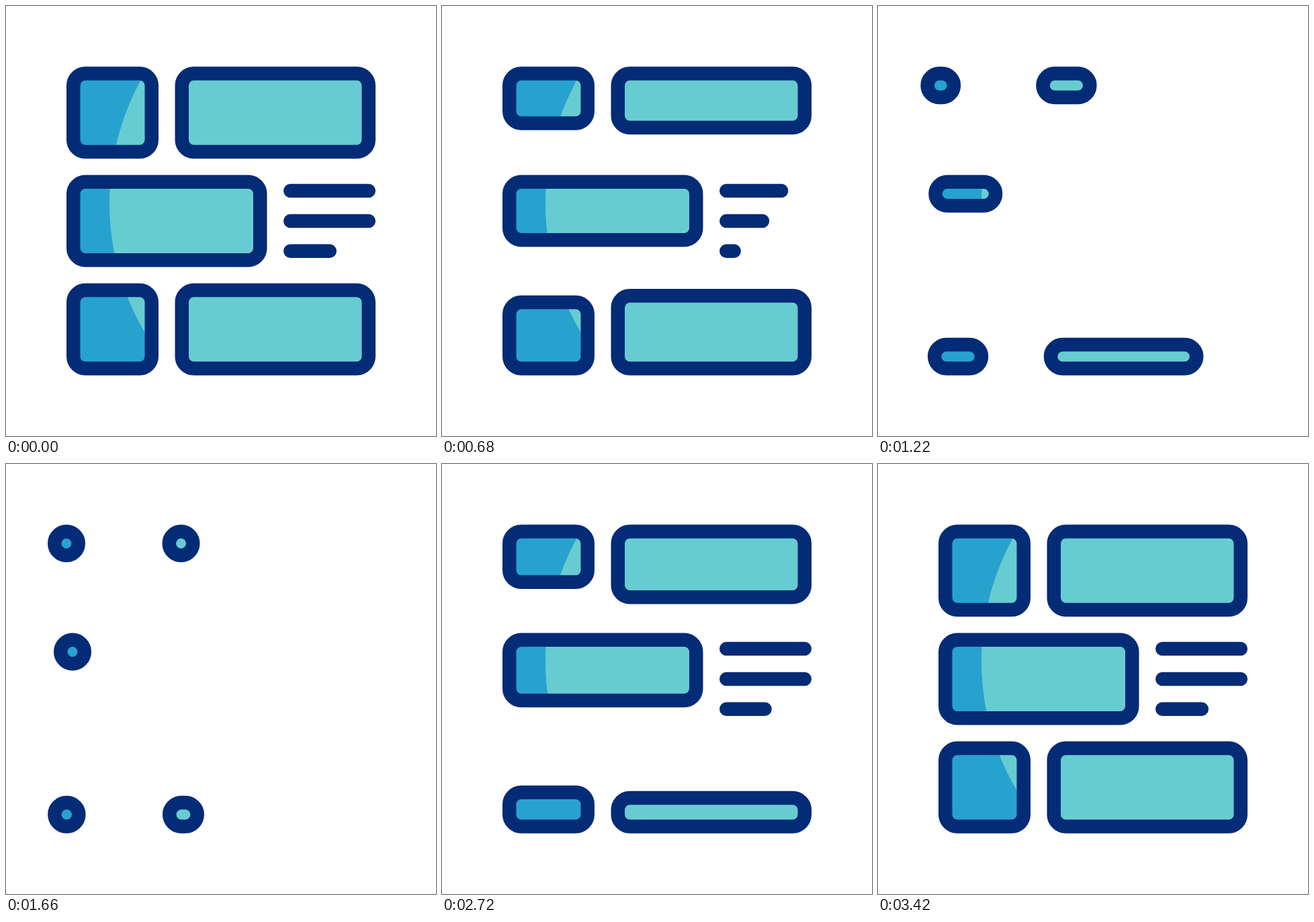
An HTML page without scripts for the animation above (3600 ms loop, 640 by 640 pixels).

```html
<!DOCTYPE html>
<html lang="en">
<head>
<meta charset="utf-8">
<title>Layout blocks</title>
<style>
  @property --w { syntax: "<number>"; inherits: false; initial-value: 1; }
  @property --h { syntax: "<number>"; inherits: false; initial-value: 1; }

  html, body { margin: 0; width: 100%; height: 100%; overflow: hidden; background: #fff; }
  svg { display: block; width: 100%; height: 100%; }

  /* --w and --h run from 0 (a dot) to 1 (full size) */
  .box {
    --grow: 81px; --shift: 28px; --left: 100.25px; --fall: 0;
    x: calc(var(--left) - (1 - var(--w)) * var(--shift));
    y: calc(var(--top) + var(--fall) * (1 - var(--h)) * 81px);
    width: calc(35.5px + var(--w) * var(--grow));
    height: calc(35.5px + var(--h) * 81px);
    rx: 17.75px;
    fill: url(#shade);
    stroke: #042b76;
    stroke-width: 20.5px;
    animation: 3600ms infinite cubic-bezier(.333, 0, .667, 0);
  }
  .wide { --grow: 242.5px; --shift: 19px; }
  .right { --left: 261.75px; }
  .row1 { --top: 100.5px; }
  .row2 { --top: 261.75px; }
  .row3 { --top: 423px; --fall: 1; }

  .line {
    --len: 116.5px;
    x: 413px;
    width: calc(20.5px + var(--w) * var(--len));
    height: 20.5px;
    rx: 10.25px;
    fill: #042b76;
    animation: 3600ms infinite cubic-bezier(.333, 0, .667, 1);
  }

  #a { animation-name: a; }
  #b { animation-name: b; }
  #c { animation-name: c; }
  #d { animation-name: d; }
  #e { animation-name: e; }
  #l1 { animation-name: l1; y: 264.75px; }
  #l2 { animation-name: l2; y: 309.75px; }
  #l3 { animation-name: l3; y: 354.5px; --len: 58.5px; }

  /* Boxes flatten, shrink to a dot, widen, then rise again */
  @keyframes a {
    0%, 1% { --w: 1; --h: 1; }
    23.2% { --w: 1; --h: 0; animation-timing-function: cubic-bezier(.333, 1, .667, 1); }
    40%, 48.6% { --w: 0; --h: 0; }
    66.9% { --w: 1; --h: 0; animation-timing-function: cubic-bezier(.39, .575, .565, 1); }
    94%, 100% { --w: 1; --h: 1; }
  }
  @keyframes b {
    0%, 1.6% { --w: 1; --h: 1; }
    24.3% { --w: 1; --h: 0; animation-timing-function: cubic-bezier(.333, 1, .667, 1); }
    44.4%, 49.6% { --w: 0; --h: 0; }
    67.8% { --w: 1; --h: 0; animation-timing-function: cubic-bezier(.333, 1, .667, 1); }
    88%, 100% { --w: 1; --h: 1; }
  }
  @keyframes c {
    0%, 2.6% { --w: 1; --h: 1; }
    25.3% { --w: 1; --h: 0; animation-timing-function: cubic-bezier(.333, 1, .667, 1); }
    47.2%, 51.9% { --w: 0; --h: 0; }
    70.1% { --w: 1; --h: 0; animation-timing-function: cubic-bezier(.333, 1, .667, 1); }
    87.6%, 100% { --w: 1; --h: 1; }
  }
  @keyframes d {
    0%, 3.9% { --w: 1; --h: 1; }
    28.7% { --w: 1; --h: 0; animation-timing-function: cubic-bezier(.333, 1, .667, 1); }
    49.7%, 51.3% { --w: 0; --h: 0; }
    73.6% { --w: 1; --h: 0; animation-timing-function: cubic-bezier(.333, .667, .667, 1); }
    93.7%, 100% { --w: 1; --h: 1; }
  }
  @keyframes e {
    0%, 7.3% { --w: 1; --h: 1; }
    32.1% { --w: 1; --h: 0; animation-timing-function: cubic-bezier(.333, 1, .667, 1); }
    51.9%, 55.2% { --w: 0; --h: 0; }
    74.7% { --w: 1; --h: 0; animation-timing-function: cubic-bezier(.333, .667, .667, 1); }
    95%, 100% { --w: 1; --h: 1; }
  }

  @keyframes l1 {
    0%, 14.4% { --w: 1; visibility: visible; }
    26.9%, 60.8% { --w: 0; visibility: hidden; }
    71.9%, 100% { --w: 1; visibility: visible; }
  }
  @keyframes l2 {
    0%, 12.5% { --w: 1; visibility: visible; }
    24.7%, 63.2% { --w: 0; visibility: hidden; }
    74.3%, 100% { --w: 1; visibility: visible; }
  }
  @keyframes l3 {
    0%, 10.6% { --w: 1; visibility: visible; }
    22.2%, 65.6% { --w: 0; visibility: hidden; }
    76.5%, 100% { --w: 1; visibility: visible; }
  }
</style>
</head>
<body>
<svg viewBox="0 0 640 640">
  <defs>
    <!-- One large disc of light shared by every box -->
    <radialGradient id="shade" gradientUnits="userSpaceOnUse" cx="534" cy="293" r="400">
      <stop offset=".949" stop-color="#67ccd1"/>
      <stop offset=".951" stop-color="#27a2cf"/>
    </radialGradient>
  </defs>
  <rect id="a" class="box row1"/>
  <rect id="b" class="box row1 wide right"/>
  <rect id="c" class="box row2 wide"/>
  <rect id="d" class="box row3"/>
  <rect id="e" class="box row3 wide right"/>
  <rect id="l1" class="line"/>
  <rect id="l2" class="line"/>
  <rect id="l3" class="line"/>
</svg>
</body>
</html>
```
